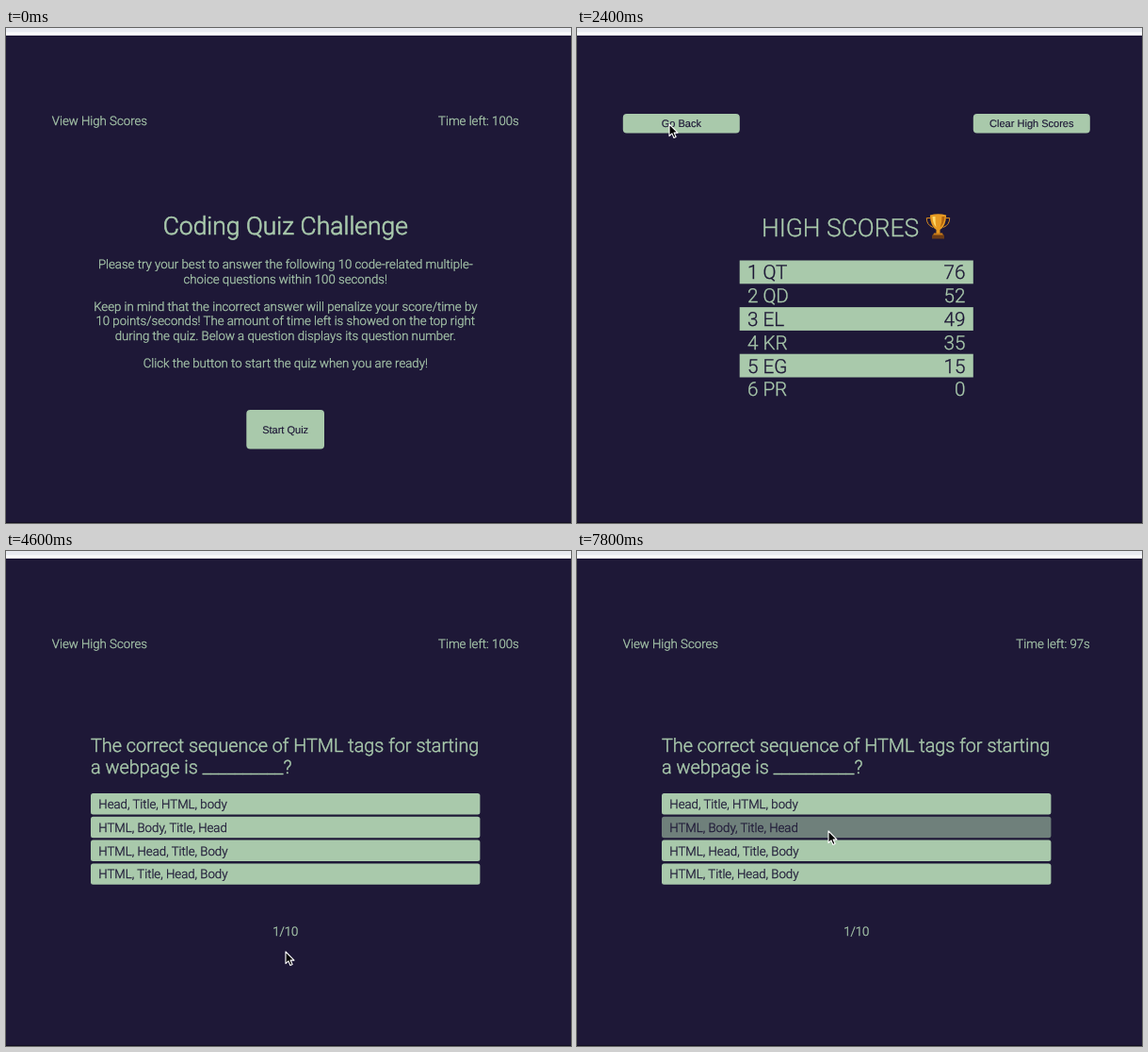
These frames come from a looping animation (600 by 525 pixels, 8000 ms). An HTML page:

```html
<!DOCTYPE html>
<html lang="en">
<head>
<meta charset="utf-8">
<title>Coding Quiz</title>
<style>
  html, body { margin: 0; width: 100%; height: 100%; overflow: hidden; background: #1e1837; }
  svg { display: block; width: 600px; height: 525px; }
  text {
    font: 300 13.23px Roboto, sans-serif; white-space: pre; text-rendering: geometricPrecision;
    fill: #aacbad; stroke: #aacbad; stroke-width: 0.3px;
  }
  .title { font-size: 26.45px; }
  .heavy { stroke-width: 0.65px; }
  .ask { font-size: 19.84px; stroke-width: 0.45px; }
  .row { font-size: 20.67px; }
  .btn { font: 11.02px "Liberation Sans", Arial, sans-serif; stroke-width: 0.15px; }
  .dark { fill: #1e1837; stroke: #1e1837; }
  .box { fill: #a9c9ab; }
  .mid { text-anchor: middle; }
  .end { text-anchor: end; }
</style>
</head>
<body>
<svg viewBox="0 0 600 525">
  <defs>
    <path id="bar" d="M-2.8 -6Q0 -6 0 -4.6Q0 -6 2.8 -6M0 -4.6V4.6M-2.8 6Q0 6 0 4.6Q0 6 2.8 6M-1.4 1.8H1.4"/>
  </defs>
  <rect width="600" height="525" fill="#1e1837"/>
  <rect width="600" height="8" fill="#fdfdfe"/>
  <rect width="600" height="4.5" fill="#e9ebf1"/>
  <rect y="524" width="600" height="1" fill="#110d22"/>
  <g id="nav"></g>
  <g id="intro"></g>
  <g id="scores"></g>
  <g id="quiz"></g>
  <g id="arrow">
    <path d="M0 0V12.6L2.9 9.9L4.9 14.5L7.1 13.5L5.1 9.1H9Z" fill="#000" stroke="#fff" stroke-width="1.1" stroke-linejoin="round"/>
  </g>
  <g id="beam" fill="none" stroke-linecap="square">
    <use href="#bar" stroke="#fff" stroke-width="2.3"/>
    <use href="#bar" stroke="#15102b" stroke-width="1.1"/>
  </g>
</svg>
<script>
const NS = "http://www.w3.org/2000/svg";
const LOOP = 8000, STEP = 200, START = 4600;
const MID = 296.8, LEFT = 48.8, RIGHT = 544.8;
const LINE = 15.5, ROW = 24.8;
const [nav, intro, scores, quiz, arrow, beam] =
  ["nav", "intro", "scores", "quiz", "arrow", "beam"].map(id => document.getElementById(id));

function add(parent, tag, attrs, content) {
  const el = document.createElementNS(NS, tag);
  for (const k in attrs) el.setAttribute(k, attrs[k]);
  if (content) el.textContent = content;
  parent.appendChild(el);
  return el;
}
const label = (g, x, y, str, cls = "") => add(g, "text", { x, y, class: cls }, str);
const box = (g, x, y, width, height, rx = 0) => add(g, "rect", { x, y, width, height, rx, class: "box" });

function button(g, x, y, w, h, str) {
  box(g, x, y, w, h, 4);
  label(g, x + w / 2, y + h / 2 + 4, str, "btn dark mid");
}

// Shared header
label(nav, LEFT, 103.2, "View High Scores");
const timer = label(nav, RIGHT, 103.2, "Time left: 100s", "end");

// Start screen
label(intro, MID, 219.4, "Coding Quiz Challenge", "title heavy mid");
let lineY = 255.4;
[
  ["Please try your best to answer the following 10 code-related multiple-",
    "choice questions within 100 seconds!"],
  ["Keep in mind that the incorrect answer will penalize your score/time by",
    "10 points/seconds! The amount of time left is showed on the top right",
    "during the quiz. Below a question displays its question number."],
  ["Click the button to start the quiz when you are ready!"]
].forEach(lines => {
  for (const str of lines) {
    label(intro, MID, lineY, str, "mid");
    lineY += LINE;
  }
  lineY += 13.3;
});
button(intro, 255.3, 405, 82.7, 41.4, "Start Quiz");

// High scores
button(scores, LEFT, 91, 124, 20.6, "Go Back");
button(scores, RIGHT - 124, 91, 124, 20.6, "Clear High Scores");
label(scores, 196, 221, "HIGH SCORES", "title");
const cup = add(scores, "g", { transform: "translate(383.5 197)" });
const part = (d, fill) => add(cup, "path", { d, fill });
part("M-8 4.5H-12.2Q-12.5 11.5 -5.5 14.5M8 4.5H12.2Q12.5 11.5 5.5 14.5", "none").setAttribute("stroke", "#d98a1c");
part("M-8.6 1.5Q0 -1 8.6 1.5Q8.2 13.5 2 17V21H-2V17Q-8.2 13.5 -8.6 1.5Z", "#e79a22");
part("M-6 3Q-5.6 10.5 -2 14.5Q-3.2 9 -3 3Z", "#ffd968");
part("M4 3H7Q6.5 10.5 2.2 14.5Q4.2 9 4 3Z", "#b3650f");
part("M-4.5 20.5H4.5L5.5 23H-5.5Z", "#c97c18");
part("M-6.5 22.5H6.5V26.5H-6.5Z", "#6d3c17");
["QT 76", "QD 52", "EL 49", "KR 35", "EG 15", "PR 0"].forEach((entry, i) => {
  const [who, points] = entry.split(" ");
  const y = 246.5 + i * ROW, cls = i % 2 ? "row" : "row dark";
  if (i % 2 === 0) box(scores, 172.7, y, 248.1, ROW);
  label(scores, 180.9, y + 19.8, `${i + 1} ${who}`, cls);
  label(scores, 412.5, y + 19.8, points, cls + " end");
});

// Question
label(quiz, 90, 212.8, "The correct sequence of HTML tags for starting", "ask");
label(quiz, 90, 236, "a webpage is __________?", "ask");
label(quiz, MID, 407.6, "1/10", "mid");
const options = [
  "Head, Title, HTML, body", "HTML, Body, Title, Head", "HTML, Head, Title, Body", "HTML, Title, Head, Body"
].map((str, i) => {
  const g = add(quiz, "g", {}), y = 257 + i * ROW;
  box(g, 90, y, 413.4, 22.4, 2.5);
  label(g, 98.3, y + 15.9, str, "dark");
  return { g, y };
});

// Pointer moves: each glides from the previous resting place
const entry = { x: 455, y: 488 };
const moves = [
  { from: 200, to: 1200, x: 98, y: 102 },
  { from: 1400, to: 1900, x: 116, y: 122 },
  { from: 1900, to: 2400, x: 98, y: 102 },
  { from: 2800, to: 3200, x: 321, y: 408 },
  { from: 3200, to: 4600, x: 297, y: 425 },
  { from: 4600, to: 6000, x: 288, y: 405 },
  { from: 7400, to: 7800, x: 267, y: 297 }
];
const smooth = p => p * p * (3 - 2 * p);

function pointer(t) {
  let { x, y } = entry;
  for (const m of moves) {
    const p = smooth(Math.min(1, Math.max(0, (t - m.from) / (m.to - m.from))));
    x += (m.x - x) * p;
    y += (m.y - y) * p;
  }
  return { x, y };
}

const show = (el, on) => el.setAttribute("display", on ? "inline" : "none");

function overText(groups, x, y) {
  return groups.some(g => [...g.querySelectorAll(":scope > text:not(.btn)")].some(el => {
    const b = el.getBBox();
    return x >= b.x && x <= b.x + b.width && y >= b.y && y <= b.y + b.height;
  }));
}

function draw(ms) {
  // The screen refreshes five times a second
  const t = Math.floor(ms / STEP) * STEP;
  const onScores = t >= 1600 && t < 2600;
  const onQuiz = t >= START;
  const page = onScores ? [scores] : [nav, onQuiz ? quiz : intro];
  for (const g of [nav, intro, scores, quiz]) show(g, page.includes(g));

  timer.textContent = `Time left: ${100 - Math.max(0, Math.floor((t - START) / 1000))}s`;

  const { x, y } = pointer(t);
  const visible = t >= STEP;
  const typing = overText(page, x, y);
  show(arrow, visible && !typing);
  show(beam, visible && typing);
  (typing ? beam : arrow).setAttribute("transform", `translate(${x} ${y})`);

  for (const o of options) {
    const over = onQuiz && y >= o.y && y <= o.y + 22.4;
    o.g.setAttribute("opacity", over ? 0.59 : 1);
  }
}

function tick(now) {
  draw(now % LOOP);
  requestAnimationFrame(tick);
}
draw(0);
requestAnimationFrame(tick);
</script>
</body>
</html>
```
